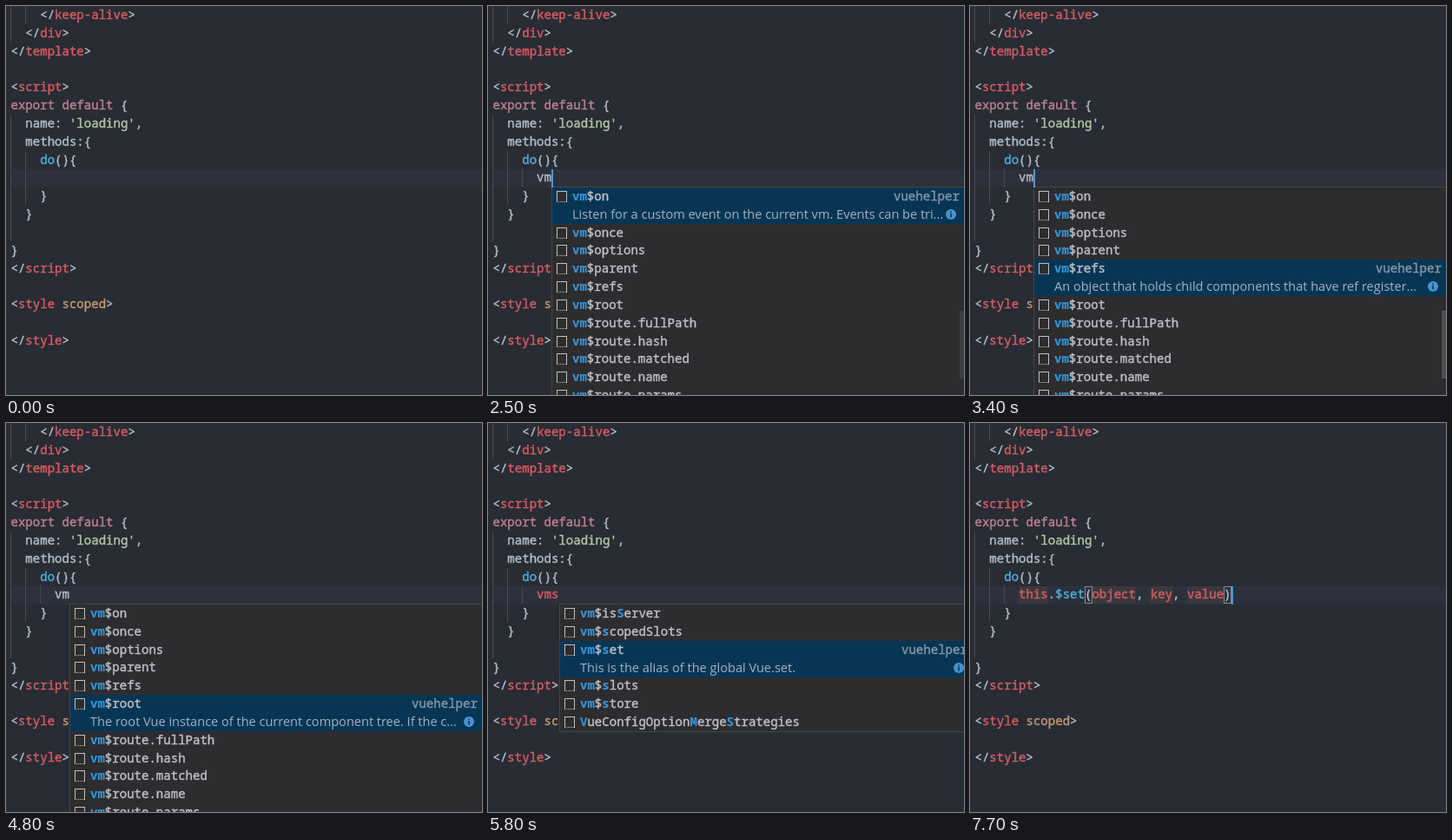
These frames come from a looping animation (548 px wide and 448 px high, 8 s). An HTML page with a canvas:

```html
<!DOCTYPE html>
<html lang="en">
<head>
<meta charset="utf-8">
<style>
  html, body { margin: 0; width: 100%; height: 100%; overflow: hidden; background: #282c34; }
  canvas { display: block; }
</style>
</head>
<body>
<canvas id="stage" width="548" height="448"></canvas>
<script>
const ctx = document.getElementById('stage').getContext('2d', { alpha: false });
const LOOP = 8000, W = 548, H = 448;
const LEFT = 5.5, CHAR = 8.43, LINE = 20.83, EDIT_LINE = 9;
const MONO = '14.05px "Noto Sans Mono", monospace';
const SANS = '14.56px "Open Sans", sans-serif';
const COLORS = {
  w: '#b5bdc8', r: '#d65c62', p: '#c08093', g: '#b3c8a4', b: '#50aee0', o: '#c09a73',
  h: '#3398e0', l: '#bfc2c6', d: '#8496a6'
};

// Each "~" starts a run whose first letter is its color key.
const CODE = [
  '~w    </~rkeep-alive~w>',
  '~w  </~rdiv~w>',
  '~w</~rtemplate~w>',
  '',
  '~w<~rscript~w>',
  '~pexport default~w {',
  "~w  name: ~g'loading'~w,",
  '~w  methods:{',
  '~b    do~w(){',
  '',
  '~w    }',
  '~w  }',
  '',
  '~w}',
  '~w</~rscript~w>',
  '',
  '~w<~rstyle~o scoped~w>',
  '',
  '~w</~rstyle~w>'
];
const CALL = '~rthis~w.~b$set~w(~robject~w, ~rkey~w, ~rvalue~w)';
const TYPED = [[0, ''], [1400, '~wv'], [1600, '~wvm'], [5300, '~rvms'], [6200, CALL]];

// Indent guides: column, first line, line after the last
const GUIDES = [[0, 0, 2], [2, 0, 1], [0, 6, 13], [2, 8, 11]];

const VM_ITEMS = ['on', 'once', 'options', 'parent', 'refs', 'root', 'route.fullPath',
  'route.hash', 'route.matched', 'route.name', 'route.params'].map(name => `~hvm~l$${name}`);
const VM_DOCS = [
  'Listen for a custom event on the current vm. Events can be tri...',
  'Listen for a custom event, but only once. The listener will be...',
  'The instantiation options used for the current Vue instance. T...',
  'The parent instance, if the current instance has one.',
  'An object that holds child components that have ref register...',
  'The root Vue instance of the current component tree. If the c...'
];
const SELECTION = [[0, 0], [2800, 1], [3000, 2], [3200, 3], [3400, 4], [3600, 5]];

const VMS_ITEMS = ['~hvm~l$is~hS~lerver', '~hvm~l$~hs~lcopedSlots', '~hvm~l$~hs~let',
  '~hvm~l$~hs~llots', '~hvm~l$~hs~ltore', '~hV~lueConfigOption~hM~lerge~hS~ltrategies'];

// Snippet fields: first column, column after the last
const FIELDS = [[6, 10], [16, 22], [24, 27], [29, 34]];
const ACTIVE_FIELD = [[6200, 0], [6700, 1], [7000, 2], [7200, 3], [7700, -1]];

// Cursor column over time, 0 while hidden
const CURSOR = [[0, 0], [700, 6], [1200, 0], [1400, 7], [1600, 8], [2100, 0], [2500, 8],
  [3000, 0], [3400, 8], [3900, 0], [4300, 8], [4800, 0], [5300, 9], [5800, 0],
  [6200, 10], [6700, 22], [7000, 27], [7200, 34], [7700, 35]];

const valueAt = (keys, t) => keys.reduce((value, [start, next]) => t >= start ? next : value, keys[0][1]);
const colX = col => LEFT + col * CHAR;

function rect(x, y, w, h, color) {
  ctx.fillStyle = color;
  ctx.fillRect(x, y, w, h);
}

// A thin outline gives the text its medium weight; matched letters are bold.
function runs(markup, x, baseline) {
  ctx.lineWidth = .4;
  for (const run of markup.split('~').slice(1)) {
    const text = run.slice(1), bold = run[0] === 'h';
    ctx.font = (bold ? 'bold ' : '') + MONO;
    ctx.fillStyle = ctx.strokeStyle = COLORS[run[0]];
    ctx.fillText(text, x, baseline);
    if (!bold) ctx.strokeText(text, x, baseline);
    x += text.length * CHAR;
  }
}

function drawCode(t) {
  rect(0, 0, W, H, '#282c34');
  rect(5, 188, W - 5, 21, '#2c313b');
  const guides = t >= 1400 ? [...GUIDES, [4, 9, 10]] : GUIDES;
  for (const [col, from, to] of guides)
    rect(Math.floor(colX(col)), Math.round(from * LINE), 1, Math.round((to - from) * LINE), '#454a53');
  CODE.forEach((line, i) => runs(line, LEFT, Math.round(i * LINE + 15)));
}

function drawFields(t) {
  const active = valueAt(ACTIVE_FIELD, t);
  FIELDS.forEach(([from, to], i) =>
    rect(colX(from), 188, (to - from) * CHAR, 20, i === active ? '#434a58' : '#3c393d'));
  if (active >= 0) return;
  ctx.strokeStyle = '#858a91';
  ctx.lineWidth = 1;
  for (const col of [15, 34])
    ctx.strokeRect(Math.round(colX(col)) + .5, 188.5, 8, 19);
}

function drawIcon(x, y) {
  const color = '#c0c0c0';
  rect(x, y, 12, 13, '#2d2d30');
  rect(x, y, 12, 1, color);
  rect(x, y, 1, 13, color);
  rect(x + 11, y, 1, 13, color);
  for (let dx = 0; dx < 12; dx += 2) rect(x + dx, y + 12, 1, 1, color);
}

function drawInfo(x, y) {
  ctx.fillStyle = '#4793cf';
  ctx.beginPath();
  ctx.arc(x, y, 6, 0, 7);
  ctx.fill();
  rect(x - .8, y - 3.5, 1.6, 1.6, '#0b3452');
  rect(x - .8, y - 1, 1.6, 4.5, '#0b3452');
}

function drawPopup(x, items, selected, doc) {
  const top = (EDIT_LINE + 1) * LINE + .6;
  const height = Math.round((items.length + 1) * LINE);
  rect(x, 208, W - x, height + 2, '#454545');
  rect(x + 1, 209, W - x, height, '#2d2d30');
  items.forEach((item, i) => {
    const y = Math.round(top + (i + (i > selected)) * LINE);
    if (i === selected) {
      rect(x + 1, y, W - x, 42, '#073655');
      runs('~dvuehelper', x + 394, y + 15);
      ctx.font = SANS;
      ctx.fillStyle = '#a3b2bf';
      ctx.fillText(doc, x + 24, y + 36);
      drawInfo(x + 460, y + 31);
    }
    drawIcon(x + 6, y + 4);
    runs(item, x + 24, y + 15);
  });
}

function thumbOpacity(t) {
  const step = Math.floor(t / 100) * 100;
  if (t < 2100) return 1;
  if (t < 2800) return 1 - (step - 2000) / 1000;
  return Math.max(0, Math.min(1, 1 - (step - 3800) / 800));
}

function draw(t) {
  drawCode(t);
  if (t >= 6200) drawFields(t);
  runs(valueAt(TYPED, t), colX(6), Math.round(EDIT_LINE * LINE + 15));

  if (t >= 1600 && t < 5400) {
    const selected = valueAt(SELECTION, t);
    drawPopup(73, VM_ITEMS, selected, VM_DOCS[selected]);
    rect(543, 351, 5, 78, `rgba(121,121,121,${.45 * thumbOpacity(t)})`);
  } else if (t >= 5400 && t < 6200) {
    drawPopup(82, VMS_ITEMS, 2, 'This is the alias of the global Vue.set.');
  }

  const col = valueAt(CURSOR, t);
  if (col) rect(Math.ceil(colX(col)), 188, 2, 21, '#4a98e0');
}

function frame() {
  draw(performance.now() % LOOP);
  requestAnimationFrame(frame);
}
frame();
</script>
</body>
</html>
```
